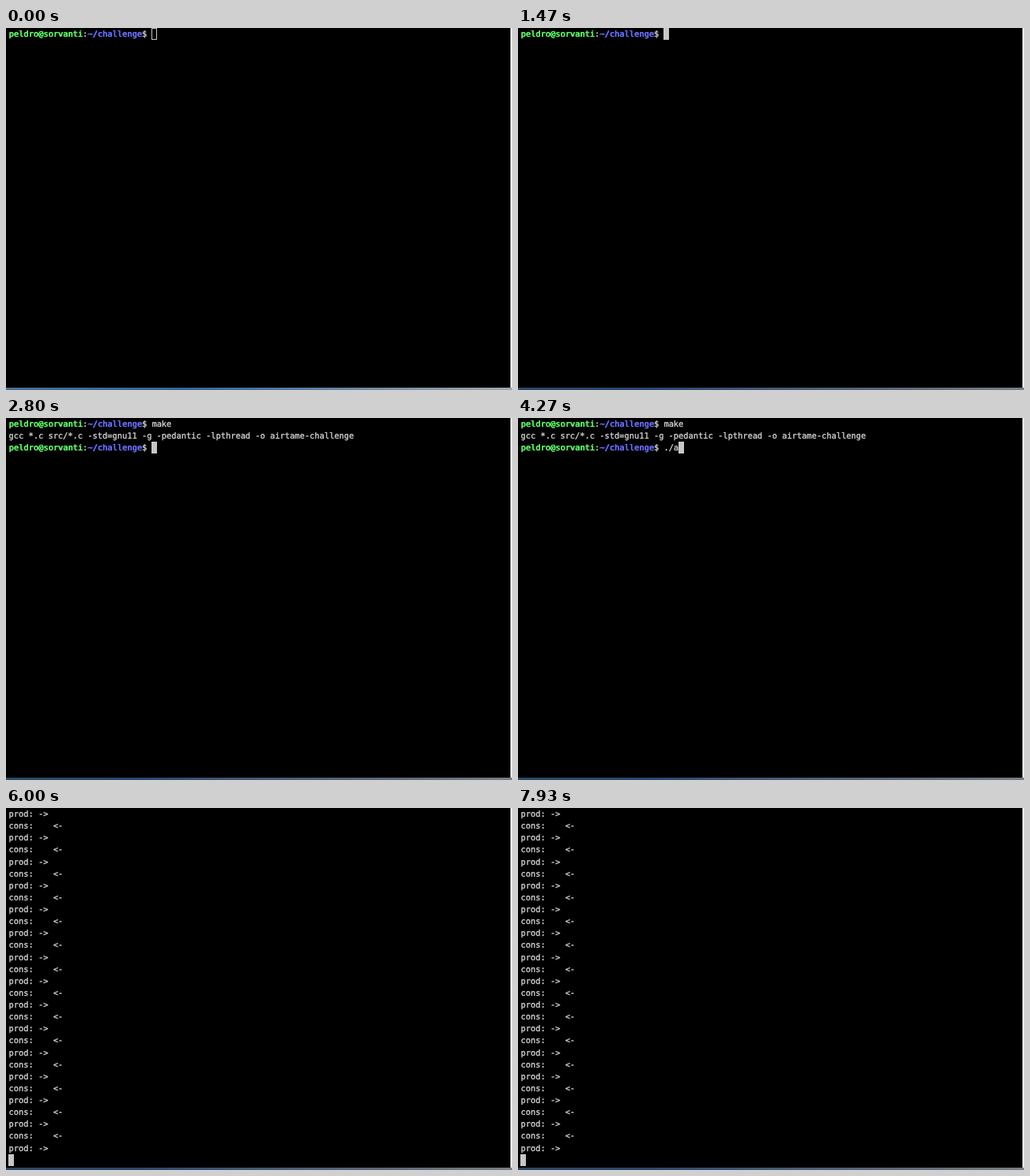
These frames come from a looping animation (640 px wide and 459 px high, 8 s). An HTML page:

```html
<!DOCTYPE html>
<html lang="en">
<head>
<meta charset="utf-8">
<title>Terminal</title>
<style>
  html, body { margin: 0; width: 100%; height: 100%; overflow: hidden; background: #000; }
  #stage { position: relative; width: 640px; height: 459px; overflow: hidden; background: #000; }
  #screen {
    position: absolute; left: 3.5px; top: 1px; margin: 0; color: #d0d0d0;
    font: 10.37px/15.125px "DejaVu Sans Mono", monospace;
    -webkit-text-stroke: 0.35px currentColor;
    text-rendering: geometricPrecision; font-variant-ligatures: none;
  }
  b { font-weight: normal; text-shadow: 0.6px 0 currentColor; }
  b.user { color: #5ffa68; }
  b.path { color: #6871ff; }
  #cursor { position: absolute; width: 6.8px; height: 15px; box-sizing: border-box; background: #c7c7c7; }
  #edge { position: absolute; left: 638px; top: 0; width: 2px; height: 456px; background: #e8e8e8; }
  #desktop { position: absolute; left: 0; top: 456px; width: 640px; height: 3px;
    background: linear-gradient(90deg, #2a4a66, #28486e 25%, #465a78 50%, #5c6878 75%, #787e86); }
  .idle #cursor { background: none; border: 1px solid #c7c7c7; }
  .idle #desktop { background: linear-gradient(90deg, #4b7090, #35639a 35%, #6484a0 65%, #a0a6ac); }
</style>
</head>
<body>
<div id="stage">
  <pre id="screen"></pre>
  <div id="cursor"></div>
  <div id="edge"></div>
  <div id="desktop"></div>
</div>
<script>
const LOOP = 8000, TICK = 200 / 3;
const ROW = 15.125, COL = 6.245, LEFT = 3.2, VISIBLE = 29;
const FOCUS = 600, BUILD = 2260, BUILT = 2530, RUN = 4795, STREAM = 4850, PERIOD = 16;
const PROMPT = '<b class="user">peldro@sorvanti</b>:<b class="path">~/challenge</b>$ ';
const PROMPT_LENGTH = 29;

// Each entry: time and the command line from then on.
const makeKeys = [[1660, 'm'], [1790, 'ma'], [1860, 'mak'], [1990, 'make']];
const runKeys = [[3860, '.'], [3990, './'], [4130, './a'], [4460, './airtame-challenge']];

const [stage, screen, cursor] = ['stage', 'screen', 'cursor'].map(id => document.getElementById(id));

const typed = (keys, t) => keys.reduce((text, [at, value]) => t >= at ? value : text, '');

function draw(t) {
  const lines = [];
  let column = 0;
  const command = keys => {
    const text = typed(keys, t);
    lines.push(PROMPT + text);
    column = PROMPT_LENGTH + text.length;
  };

  command(makeKeys);
  if (t >= BUILD) {
    lines.push('gcc *.c src/*.c -std=gnu11 -g -pedantic -lpthread -o airtame-challenge');
    if (t >= BUILT) command(runKeys);
    else { lines.push(''); column = 0; }
  }
  if (t >= RUN) {
    lines.push('Frame period is 16', 'cons: no frames avaialble');
    const count = t < STREAM ? 0 : 2 * Math.floor((t - STREAM) / PERIOD) + 1;
    for (let i = 0; i < count; i++) lines.push(i % 2 ? 'cons:    &lt;-' : 'prod: -&gt;');
    lines.push('');
    column = 0;
  }

  const shown = lines.slice(-VISIBLE - 1);
  screen.innerHTML = shown.join('\n');
  cursor.style.left = LEFT + column * COL + 'px';
  cursor.style.top = (shown.length - 1) * ROW + 'px';
  stage.className = t < FOCUS ? 'idle' : '';
}

let lastTick = -1;
function frame() {
  // The screen refreshes fifteen times a second.
  const tick = Math.floor((performance.now() % LOOP + 4) / TICK) % 120;
  if (tick !== lastTick) draw(tick * TICK);
  lastTick = tick;
  requestAnimationFrame(frame);
}
frame();
</script>
</body>
</html>
```
